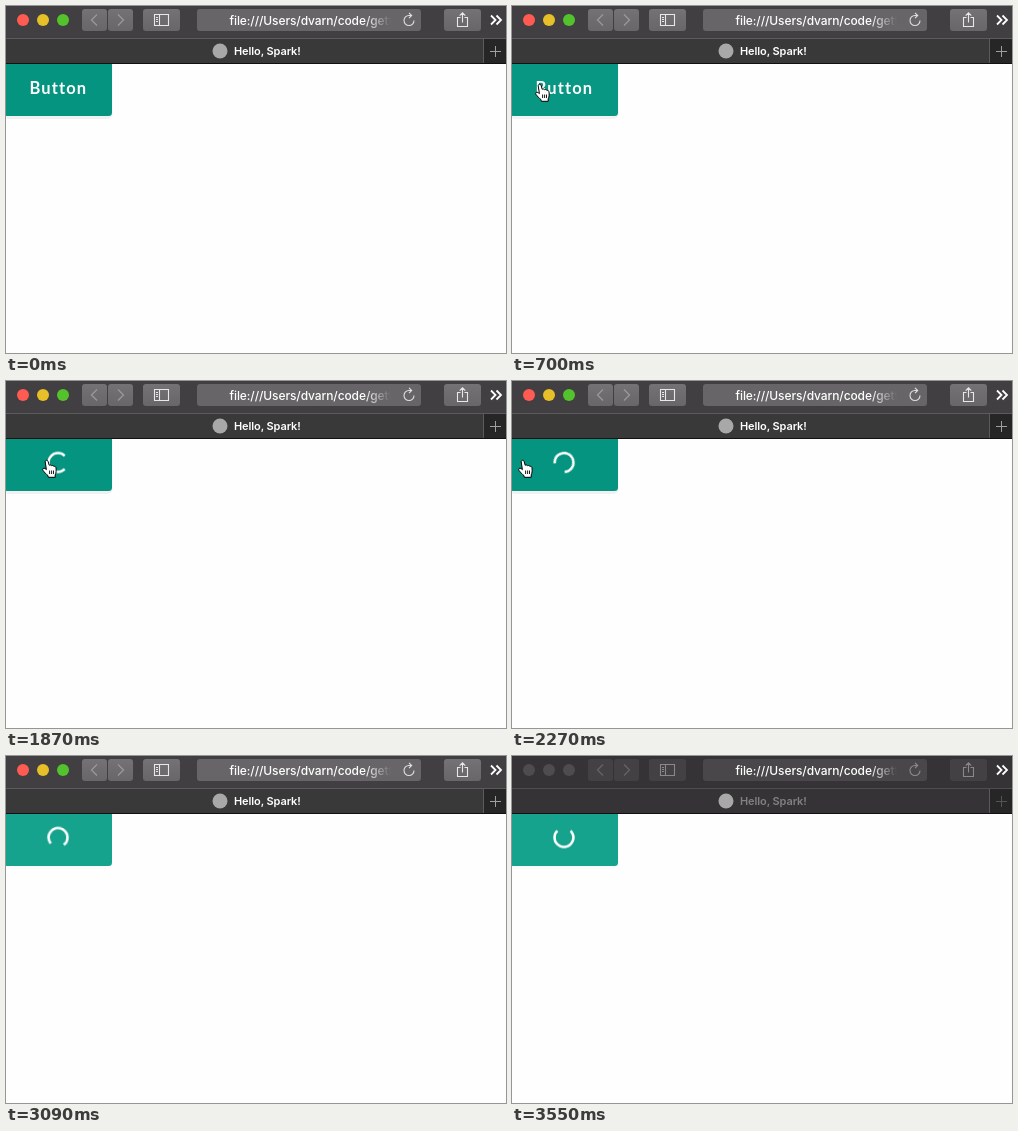
Write an HTML page that moves like this. It is 500 px wide and 347 px high and loops after 3650 ms.

```html
<!DOCTYPE html>
<html lang="en">
<head>
<meta charset="utf-8">
<title>Hello, Spark!</title>
<style>
html, body { margin: 0; width: 100%; height: 100%; overflow: hidden; background: #fefefe; }
svg { display: block; width: 500px; height: 347px; font-family: Inter, "Liberation Sans", sans-serif; }

svg, .button, .shadow, .label, .spinner, .ring, .cursor, .arrow, .hand {
  animation: 3650ms step-end infinite;
}

/* browser window: focused, then in the background */
svg { animation-name: focus; }
.bar { fill: var(--bar); }
.line { fill: var(--line); }
.tabs { fill: var(--tabs); }
.new-tab { fill: #272627; }
.btn { fill: url(#metal); }
.top { stop-color: var(--top); }
.base { stop-color: var(--btn); }
.field { fill: var(--field); }
.icon { fill: none; stroke: var(--icon); stroke-width: 1.1; }
.faint { stroke: var(--faint); stroke-width: 1.3; }
.reload { stroke: var(--reload); }
.title { fill: var(--title); font-size: 11px; font-weight: 600; letter-spacing: -.1px; }
.site { fill: #a9a8a9; }
.url { fill: #fff; font-size: 12px; font-weight: 500; letter-spacing: -.1px; }
@keyframes focus {
  0% {
    --bar: #413f41; --line: #5c5a5c; --tabs: #3a393a; --top: #747274; --btn: #686668;
    --field: #676567; --icon: #e8e8e8; --faint: #9a989a; --reload: #e0e0e0;
    --title: #fff; --plus: #a09fa0;
    --red: #ff5b52; --yellow: #e6bf29; --green: #53c22c;
  }
  97.205%, 100% {
    --bar: #353335; --line: #4f4d4f; --tabs: #353335; --top: #434143; --btn: #434143;
    --field: #494749; --icon: #8a888a; --faint: #656365; --reload: #8d8b8d;
    --title: #828082; --plus: #555355;
    --red: #4e4c4e; --yellow: #4e4c4e; --green: #4e4c4e;
  }
}

/* the page button */
.button { animation-name: hover; animation-timing-function: linear; }
@keyframes hover {
  0%, 4.602% { fill: #04947f; }
  4.603%, 12.877% { fill: #15a38d; }
  21.1%, 64.2% { fill: #04947f; }
  72.4%, 100% { fill: #15a38d; }
}
.shadow { fill: #000; animation-name: lift; animation-timing-function: linear; }
@keyframes lift {
  0%, 4.602% { opacity: .05; }
  4.603%, 12.877% { opacity: .01; }
  21.1%, 64.2% { opacity: .05; }
  72.4%, 100% { opacity: .01; }
}
.label {
  fill: #fff; font: 700 16.5px Lato, "Open Sans", sans-serif; letter-spacing: 1.1px;
  animation-name: label;
}
@keyframes label { 0% { opacity: 1; } 51.178%, 100% { opacity: 0; } }
.spinner { animation-name: busy; }
@keyframes busy { 0% { opacity: 0; } 51.178%, 100% { opacity: 1; } }

/* steady turning, redrawn about every 58 ms */
.ring { fill: none; stroke: #fff; stroke-width: 2.4; animation-name: spin; }
@keyframes spin {
  0% { transform: rotate(0deg); }
  51.178% { transform: rotate(0deg); animation-timing-function: steps(15); }
  75.014% { transform: rotate(326deg); animation-timing-function: steps(12); }
  93.918% { transform: rotate(586deg); animation-timing-function: steps(2); }
  97.205%, 100% { transform: rotate(630deg); }
}

/* mouse pointer */
.cursor { animation-name: travel; }
@keyframes travel {
  0% { transform: translate(-30px, 75px); }
  12.822% { transform: translate(-3.5px, 75px); }
  14.466% { transform: translate(3px, 76px); }
  16.1% { transform: translate(13px, 77px); }
  17.7% { transform: translate(23px, 78px); }
  19.3% { transform: translate(31px, 79px); }
  20.9% { transform: translate(36px, 79px); }
  22.4% { transform: translate(37px, 79px); }
  24.055% { transform: translate(36px, 79px); }
  54.4% { transform: translate(35px, 79px); }
  56% { transform: translate(31px, 80px); }
  57.6% { transform: translate(24px, 80px); }
  59.2% { transform: translate(15px, 80px); }
  60.8% { transform: translate(6px, 79px); }
  62.3% { transform: translate(-3px, 78px); }
  63.9%, 100% { transform: translate(-30px, 78px); }
}
.arrow { animation-name: arrow; }
@keyframes arrow { 0% { opacity: 1; } 14.466% { opacity: 0; } 62.3%, 100% { opacity: 1; } }
.hand { animation-name: hand; }
@keyframes hand { 0% { opacity: 0; } 14.466% { opacity: 1; } 62.3%, 100% { opacity: 0; } }
</style>
</head>
<body>
<svg viewBox="0 0 500 347" xmlns="http://www.w3.org/2000/svg">
  <defs>
    <linearGradient id="metal" x2="0" y2="1">
      <stop class="top" offset="0"/>
      <stop class="base" offset="1"/>
    </linearGradient>
    <linearGradient id="fade" gradientUnits="userSpaceOnUse" x1="358" x2="385" y1="0" y2="0">
      <stop offset="0" stop-color="#fff"/>
      <stop offset="1" stop-color="#fff" stop-opacity="0"/>
    </linearGradient>
    <mask id="cut" maskUnits="userSpaceOnUse" x="191" y="0" width="224" height="30">
      <rect x="191" width="194" height="30" fill="url(#fade)"/>
    </mask>
    <clipPath id="page"><rect y="58" width="500" height="289"/></clipPath>
  </defs>

  <rect width="500" height="347" fill="#fefefe"/>

  <g clip-path="url(#page)">
    <rect class="shadow" x="-2" y="50" width="108.5" height="63" rx="5"/>
    <rect class="button" x="-2" y="50" width="108" height="60" rx="3.5"/>
    <text class="label" x="23.5" y="88">Button</text>
    <g class="spinner">
      <g transform="translate(52 81.5)">
        <path class="ring" d="M6.72 6.72A9.5 9.5 0 1 1 6.72 -6.72"/>
      </g>
    </g>
    <g class="cursor">
      <path class="arrow" d="M0 0V14.5L3.4 11.3L5.4 16.2L8 15.1L6 10.4H10.6Z"
        fill="#000" stroke="#fff" stroke-width="1.1"/>
      <g class="hand" stroke="#000" stroke-linejoin="round">
        <path d="M3.2 1.9c-.3-2 2.6-2.3 3-.2l1 3.6c.8-.6 2-.4 2.4.5.9-.6 2-.3 2.3.6 1-.4 2 .3 2.1 1.5.3 3 .2 5-.8 7v2.4H6.3l-.4-1.8c-1.6-1-3.6-3.4-5-5.2-1-1.6.9-2.8 2.3-1.6l1.2.9z" fill="#fff"/>
        <path d="M7.6 10.500v3.500M9.600 10.500v3.500M11.500 10.500v3.500" stroke-width=".9"/>
      </g>
    </g>
  </g>

  <rect class="bar" width="500" height="32"/>
  <rect class="line" y="32" width="500" height="1"/>
  <rect class="tabs" y="33" width="500" height="24"/>
  <rect class="new-tab" x="478" y="33" width="22" height="24"/>
  <rect x="477" y="33" width="1" height="24" fill="#5b595b"/>
  <rect y="57" width="500" height="1" fill="#111"/>

  <circle cx="17" cy="14" r="6" style="fill:var(--red)"/>
  <circle cx="37" cy="14" r="6" style="fill:var(--yellow)"/>
  <circle cx="57" cy="14" r="6" style="fill:var(--green)"/>

  <rect class="btn" x="76" y="3" width="25" height="22" rx="3"/>
  <rect class="btn" x="102" y="3" width="25" height="22" rx="3"/>
  <path class="icon faint" d="M91 8.5L85.5 14L91 19.5M112 8.5L117.5 14L112 19.5"/>

  <rect class="btn" x="137" y="3" width="37" height="22" rx="3"/>
  <path class="icon" d="M148.5 8.5h14v11h-14zM153.5 8.5v11M150 11.5h2M150 13.5h2M150 15.5h2"/>

  <rect class="field" x="191" y="3" width="224" height="22" rx="3"/>
  <g mask="url(#cut)">
    <text class="url" x="223.5" y="18.5">file:///Users/dvarn/code/getting</text>
  </g>
  <path class="icon reload" d="M408 14.5a5 5 0 1 1-5-5h2.500M403 6.800l2.700 2.700l-2.700 2.700"/>

  <rect class="btn" x="438" y="3" width="37" height="22" rx="3"/>
  <path class="icon" d="M454.5 11.5h-3v9h10v-9h-3M456.5 16.5v-9.5M453.7 9.6L456.5 6.8L459.3 9.6"/>
  <path d="M485 9.5L489.5 14L485 18.5M490.5 9.5L495 14L490.5 18.5" fill="none" stroke="#fff" stroke-width="1.8"/>

  <circle class="site" cx="214" cy="45" r="7.5"/>
  <text class="title" x="228" y="49">Hello, Spark!</text>
  <path d="M484 45.5h11M489.5 40v11" fill="none" style="stroke:var(--plus)"/>
</svg>
</body>
</html>
```
